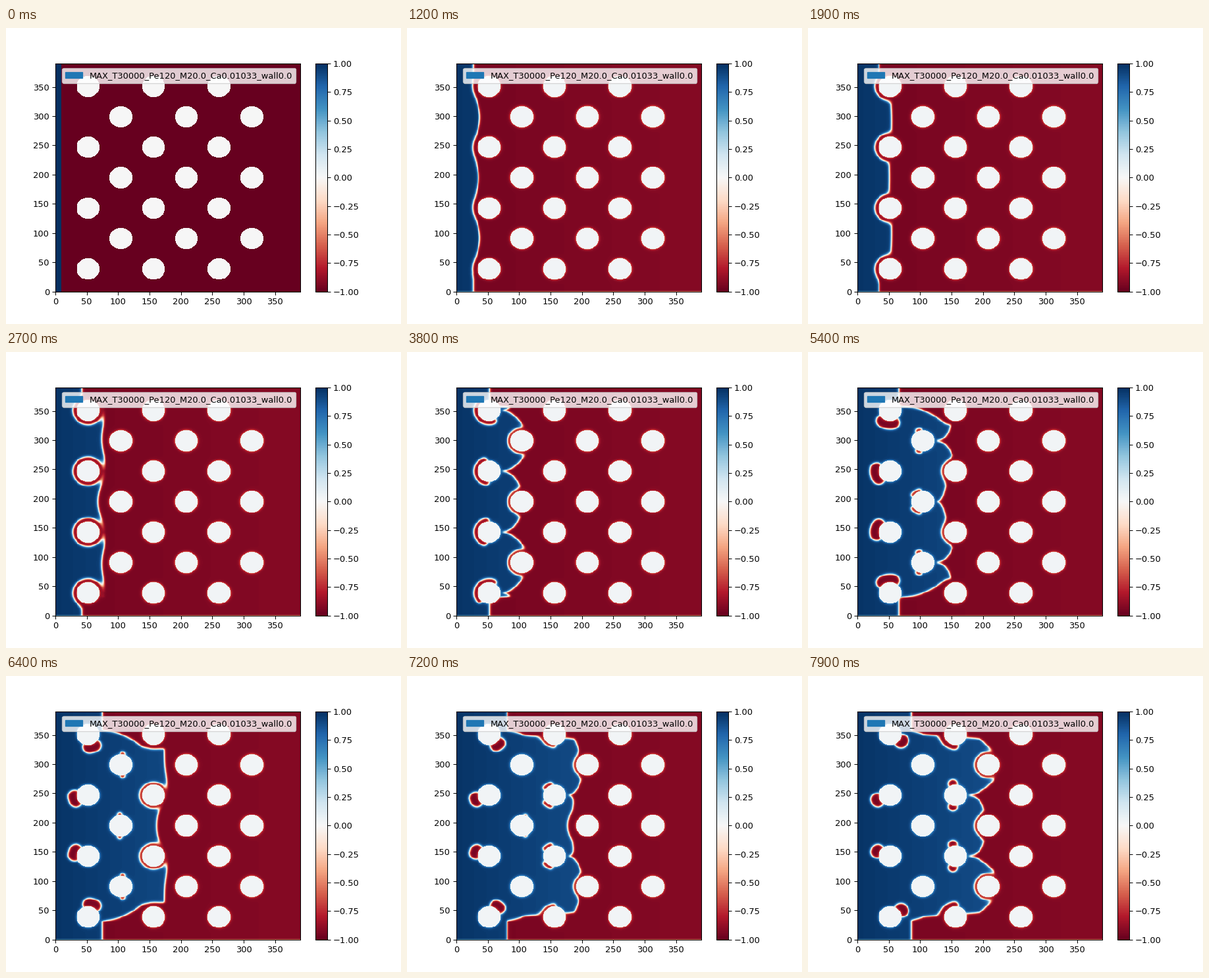
Animation, 600 px wide and 450 px high, one loop 8 s. Source, as a matplotlib script:

```python
import numpy as np
import matplotlib.pyplot as plt
from matplotlib.animation import FuncAnimation
from matplotlib.patches import Patch

SIZE = 390           # domain edge in cells
FRAMES, STEP_MS = 80, 100
RADIUS = 18.3        # solid grains
PITCH, ROW0 = 104, 39
LABEL = "MAX_T30000_Pe120_M20.0_Ca0.01033_wall0.0"

# Trapped film per grain column: thickness, later swelling, delay
FILMS = {52: (5.4, 5, 10), 104: (4, -11, 18), 156: (4, 4, 0), 208: (4, 0, 0)}

grains = [(52 + PITCH * i + 52 * (j % 2), ROW0 + 52 * j) for j in range(7) for i in range(3)]

# Flow is mirrored about mid height: distances come from a coarse lower half.
gx, gy = np.arange(0, 241, 2.0), np.arange(0, 197, 2.0)
GX, GY = np.meshgrid(gx, gy)
cells = np.arange(SIZE) + 0.5
X, Y = np.meshgrid(cells, cells)


def hat(fine, coarse):
    return np.maximum(0, 1 - np.abs(fine[:, None] - coarse) / 2)


UP_X = hat(np.minimum(cells, 240), gx).T
UP_Y = hat(cells[:SIZE // 2], gy)

gap = np.min([np.hypot(X - cx, Y - cy) for cx, cy in grains], axis=0) - RADIUS
solid = gap < 0
damping = 1 - 0.4 * np.exp(-np.maximum(gap, 0) / 1.3)
damping[[0, -1]] *= 0.55
RED = 0.955 - 0.04 * X / SIZE
BLUE = 0.98 - 0.08 * np.minimum(X / 200, 1)


def ease(t):
    t = np.clip(t, 0, 1)
    return t * t * (3 - 2 * t)


def advance(y, k):
    """Reach of the free front at height y."""
    speed = 2.5 + 0.13 * np.cos(2 * np.pi * (y - 100) / 190)
    return 10 + speed * k * (1 - np.exp(-k / 9))


def front(y, k):
    """Front position: free advance, necks pinned behind grains, slow wall layer."""
    row = np.round((y - ROW0) / 52)
    first = 52 + 52 * (row % 2)
    reach = advance(ROW0 + 52 * row, k)
    past = (reach - first + 24) % PITCH - 24
    lag = np.maximum(past - 18, 0) * (1 - ease((past - 54) / 3)) * (reach > first - 24)
    cusp = 1 - np.abs((y - ROW0 - 52 * row) / 26) ** 0.45
    s = advance(y, k)
    wave = 4 * np.cos(2 * np.pi * (s - 28) / PITCH) * np.cos(2 * np.pi * (y - ROW0) / PITCH)

    wall = 10 + 76 * (k / 79) ** 0.8
    opening = 62 - 22 * ease((s - 170) / 20)
    ramp = 70 + 70 * np.sqrt(np.maximum(y - 32, 0) / 30) + 12 * np.maximum(y - opening, 0)
    limit = np.where(y < 32, wall, np.maximum(wall, ramp))
    return np.minimum(s - lag * cusp - wave, limit)


def front_distance(k):
    """Signed distance to the front, positive on the invading side."""
    y = np.arange(-12, 209.0)
    x = np.convolve(front(y, k), [0.25, 0.5, 0.25], mode="same")[2:-2]
    y = y[2:-2]
    best = np.full(GX.shape, np.inf)
    for x0, y0, dx in zip(x, y, np.diff(x)):
        px, py = GX - x0, GY - y0
        t = np.clip((px * dx + py) / (dx * dx + 1), 0, 1)
        best = np.minimum(best, (px - t * dx) ** 2 + (py - t) ** 2)
    return np.sqrt(best) * np.where(GX < np.interp(GY, y, x), 1, -1)


def arc_distance(cx, cy, angle, span, thick):
    """Distance to a thick arc hugging a grain."""
    r = 16.5 + thick / 2
    off = (np.degrees(np.arctan2(GY - cy, GX - cx)) - angle + 180) % 360 - 180
    near = np.radians(angle + np.clip(off, -span, span))
    return np.hypot(GX - cx - r * np.cos(near), GY - cy - r * np.sin(near)) - thick


def film_distance(k, cx, cy):
    """A full film, which breaks into drops once the front has passed."""
    steps = np.arange(200)
    age = k - np.interp(cx + 26, advance(cy, steps), steps)
    film, swell, delay = FILMS[cx]
    thick = film + swell * ease((age - delay) / 15)
    if age < 0:
        arcs = [(180, 180)]
    elif cx == 52:
        angle = 168 - 2.7 * age if cy == ROW0 else 180 - 0.45 * age
        arcs = [(angle, 140 * np.exp(-age / 14))]
    elif cy == ROW0:
        arcs = [(165, 70)]
    else:
        turn, span = 45 + 3 * age, 45 * np.exp(-age / 3)
        arcs = [(180 - turn, span), (180 + turn, span)]
    return np.min([arc_distance(cx, cy, a, span, thick) for a, span in arcs], axis=0)


def blend(a, b, k=8):
    """Smooth minimum."""
    h = np.maximum(k - np.abs(a - b), 0) / k
    return np.minimum(a, b) - h * h * k / 4


def field(k):
    if k == 0:
        return np.where(solid, 0, np.where(X < 9.5, 1.0, -1.0))
    films = [film_distance(k, cx, cy) for cx, cy in grains if cx in FILMS and cy <= 195]
    dist = blend(front_distance(k), np.min(films, axis=0))
    half = UP_Y @ dist @ UP_X
    phase = np.tanh(np.vstack([half, half[::-1]]) / 2)
    phase *= np.where(phase > 0, BLUE, RED) * damping
    return np.where(solid, 0.03, phase)


fig, ax = plt.subplots(figsize=(6.4, 4.8), dpi=93.75)
image = ax.imshow(field(0), cmap="RdBu", vmin=-1, vmax=1, origin="lower", aspect="auto",
                  extent=(0, SIZE, 0, SIZE), interpolation="nearest")
fig.colorbar(image)
ax.legend(handles=[Patch(color="C0", label=LABEL)], loc="upper right")


def update(k):
    image.set_data(field(k))
    return [image]


anim = FuncAnimation(fig, update, frames=FRAMES, interval=STEP_MS, repeat=True, repeat_delay=0)
plt.show()
```
